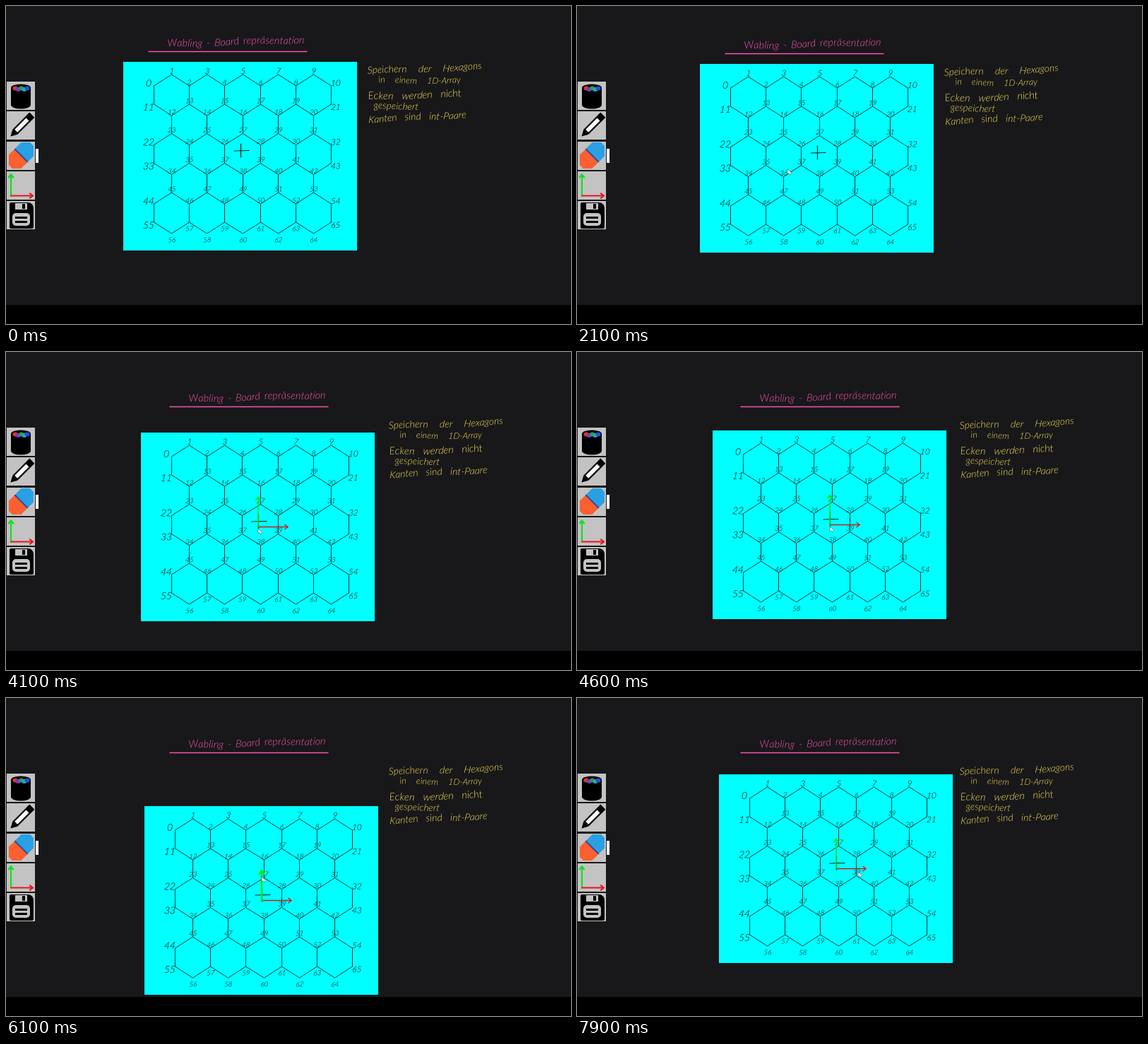
An HTML page with a canvas for the animation above (8000 ms loop, 800 by 450 pixels).

```html
<!DOCTYPE html>
<html lang="de">
<head>
<meta charset="utf-8">
<title>Board repräsentation</title>
<style>
html, body { margin: 0; width: 100%; height: 100%; overflow: hidden; background: #18171a; }
canvas { display: block; width: 800px; height: 450px; }
</style>
</head>
<body>
<canvas id="stage" width="800" height="450"></canvas>
<script>
const ctx = document.getElementById('stage').getContext('2d');
const LOOP = 8000, STEP = 100, PAN_END = 2700;
const HOME = { x: 166, y: 79 };
const BOARD = { w: 331, h: 267 };
const CENTER = { x: 166, y: 133.5 };

// Keys of [time, x, y]; the board first pans with the notes, then moves alone.
const boardKeys = [
  [1800, HOME.x, HOME.y], [PAN_END, 196, 92], [3600, 196, 92], [4250, 190, 117],
  [5300, 196, 94], [5500, 196, 94], [6000, 196, 158], [6500, 196, 108],
  [7400, 196, 108], [7900, 201, 108]
];
// Pointer position relative to the board.
const gripKeys = [
  [800, -56, 220], [1500, -126, 185], [1900, 120, 150], [2900, 166, 136],
  [5200, 166, 136], [5450, 166, 100], [6500, 166, 100], [6900, 213, 135], [7400, 197, 138]
];

function along(keys, t) {
  const next = keys.findIndex(key => t <= key[0]);
  if (next <= 0) {
    const [, x, y] = keys.at(next);
    return { x, y };
  }
  const [t0, x0, y0] = keys[next - 1], [t1, x1, y1] = keys[next];
  const u = (1 - Math.cos(Math.PI * (t - t0) / (t1 - t0))) / 2;
  return { x: Math.round(x0 + (x1 - x0) * u), y: Math.round(y0 + (y1 - y0) * u) };
}

function rect(color, x, y, w, h) {
  ctx.fillStyle = color;
  ctx.fillRect(x, y, w, h);
}

function ellipse(color, x, y, rx, ry) {
  ctx.fillStyle = color;
  ctx.beginPath();
  ctx.ellipse(x, y, rx, ry, 0, 0, Math.PI * 2);
  ctx.fill();
}

function trace(points) {
  ctx.beginPath();
  for (const [x, y] of points) ctx.lineTo(x, y);
}

function line(color, width, ...points) {
  ctx.strokeStyle = color;
  ctx.lineWidth = width;
  trace(points);
  ctx.stroke();
}

function poly(color, ...points) {
  ctx.fillStyle = color;
  trace(points);
  ctx.fill();
}

function arrow(color, width, x, y, dx, dy, head) {
  ctx.save();
  ctx.translate(x + dx, y + dy);
  ctx.rotate(Math.atan2(dy, dx));
  line(color, width, [-Math.hypot(dx, dy), 0], [0, 0]);
  line(color, width, [-head, -head * 0.8], [0, 0], [-head, head * 0.8]);
  ctx.restore();
}

const setFont = size => { ctx.font = `italic 300 ${size}px Lato, "Open Sans", sans-serif`; };

// Letters set one by one, each slightly tilted and shifted like handwriting.
function write(text, x, y, size, color, gap = 0, rise = 0) {
  setFont(size);
  ctx.fillStyle = color;
  const slope = rise / (ctx.measureText(text).width + gap);
  let pen = 0;
  [...text].forEach((ch, i) => {
    const wobble = Math.sin(i * 12.9 + text.length * 7.3);
    ctx.save();
    ctx.translate(x + pen, y + pen * slope + wobble * 0.6);
    ctx.rotate(wobble * 0.12);
    ctx.fillText(ch, 0, 0);
    ctx.restore();
    pen += ch === ' ' ? gap : ctx.measureText(ch).width;
  });
}

function drawNotes() {
  const pink = '#f456b0', gold = '#f0dc50';
  write('Wabling - Board repräsentation', 229, 58, 14.5, pink, 6, -6);
  line(pink, 1.4, [202, 64.5], [426, 64.5]);
  write('Speichern der Hexagons', 512, 96, 14, gold, 16, -6);
  write('in einem 1D-Array', 528, 109, 12.5, gold, 14);
  write('Ecken werden nicht', 513, 132, 14.5, gold, 12, -3);
  write('gespeichert', 521, 146, 13.5, gold);
  write('Kanten sind int-Paare', 513, 165, 14, gold, 11, -7);
}

// Six zigzag rows of eleven corners, numbered left to right.
function corner(row, j) {
  const peak = j % 2 ? 16 : 0;
  const shoulder = 34 + Math.floor(row / 2) * 83.5 + (row % 2) * 26;
  return [Math.round(43 + j * 25.1) + 0.5, shoulder + (row % 2 ? peak : -peak)];
}

function drawLabel(row, j) {
  const [x, y] = corner(row, j);
  const text = String(row * 11 + j);
  const side = j === 0 ? -8 : j === 10 ? 6 : 0;
  const size = j === 0 ? 14 : side || (row === 0 && j % 2) ? 12 : 10;
  const lift = side ? (row % 2 ? 3 : -5) : row === 5 ? 8 : -6;
  setFont(size);
  write(text, x + side - ctx.measureText(text).width / 2, y + lift + size * 0.36, size, '#000');
}

function drawBoard({ x, y }) {
  const ink = '#003c44';
  ctx.save();
  ctx.translate(x, y);
  rect('#00ffff', 0, 0, BOARD.w, BOARD.h);
  for (let row = 0; row < 6; row++) {
    const zigzag = Array.from({ length: 11 }, (_, j) => corner(row, j));
    line(ink, 1, ...zigzag);
    for (let j = row % 2; row < 5 && j < 11; j += 2) line(ink, 1, zigzag[j], corner(row + 1, j));
    for (let j = 0; j < 11; j++) drawLabel(row, j);
  }
  line('#002020', 1.2, [157, 126], [178, 125.5]);
  line('#002020', 1.2, [166.5, 116], [166.5, 135]);
  ctx.restore();
}

function drawGizmo(board, t) {
  const x = board.x + CENTER.x, y = board.y + CENTER.y;
  const greenHot = t < 3600 || (t >= 5300 && t <= 6500);
  arrow('#c81e1e', 1.4, x, y, 42, 0, 4);
  arrow('#14e614', greenHot ? 2.6 : 1.6, x, y, 0, -42, 4);
}

function drawBucket() {
  rect('#000', 7, 116, 28, 24);
  ellipse('#000', 21, 140, 14, 5.5);
  ellipse('#000', 21, 116, 14, 5.5);
  ['#d83434', '#7a38c8', '#22a050', '#20a8c0', '#2850d0'].forEach((color, i) =>
    ellipse(color, 13 + i * 4.3, 116.5 + (i % 2) * 1.5, 3.5, 3));
}

function drawPencil() {
  ctx.save();
  ctx.translate(22, 169);
  ctx.rotate(-Math.PI / 4);
  rect('#000', -13, -5, 34, 10);
  poly('#000', [-13, -5], [-22, 0], [-13, 5]);
  rect('#fff', -11, -2.8, 23, 5.6);
  ctx.restore();
}

function drawEraser() {
  ctx.save();
  ctx.beginPath();
  ctx.rect(4, 193, 35, 37);
  ctx.clip();
  ctx.translate(21.5, 211.5);
  ctx.rotate(-Math.PI / 4);
  rect('#fa6030', -22, -13, 22, 26);
  rect('#2aa0e4', 0, -13, 22, 26);
  rect('#344a9c', -1, -13, 2, 26);
  ctx.restore();
}

function drawAxes() {
  arrow('#10e020', 2.2, 7, 268.5, 0, -30, 4);
  arrow('#ec1420', 2.2, 7, 268.5, 31, 0, 4);
}

function drawDisk() {
  ctx.fillStyle = '#000';
  ctx.beginPath();
  ctx.roundRect(5, 278, 34, 37, [2, 8, 2, 2]);
  ctx.fill();
  rect('#c3c3c3', 13, 279, 17, 9);
  rect('#000', 23, 280, 4, 7);
  ctx.fillStyle = '#c3c3c3';
  ctx.beginPath();
  ctx.roundRect(9, 293, 25, 18, 5);
  ctx.fill();
  for (const y of [298, 304]) rect('#000', 13, y, 17, 3);
}

function drawToolbar(hover) {
  [drawBucket, drawPencil, drawEraser, drawAxes, drawDisk].forEach((icon, i) => {
    const y = Math.round(107 + i * 42.25);
    rect('#c3c3c3', 1, y, 40, 40);
    icon();
    if (icon === drawAxes && hover) rect('rgba(0,0,0,.35)', 1, y, 40, 40);
  });
  rect('#fff', 42, 202, 4, 20);
}

function drawCursor(x, y) {
  const shape = [[x, y], [x, y + 7], [x + 2, y + 5.5], [x + 4, y + 8], [x + 5.4, y + 5]];
  poly('#fff', ...shape);
  line('#555', 0.6, ...shape, shape[0]);
}

function draw(t) {
  rect('#18171a', 0, 0, 800, 450);
  rect('#000', 0, 423, 800, 27);
  ctx.lineCap = ctx.lineJoin = 'round';

  const pan = along(boardKeys, Math.min(t, PAN_END));
  ctx.save();
  ctx.translate(pan.x - HOME.x, pan.y - HOME.y);
  drawNotes();
  ctx.restore();

  const board = along(boardKeys, t);
  drawBoard(board);
  if (t >= 2900) drawGizmo(board, t);

  const grip = along(gripKeys, t);
  const x = board.x + grip.x, y = board.y + grip.y;
  const shown = t >= 800;
  drawToolbar(shown && x <= 41 && y >= 234 && y <= 274);
  if (shown) drawCursor(x, y);
}

const start = performance.now();
function tick() {
  const t = (performance.now() - start) % LOOP;
  draw(Math.floor(t / STEP) * STEP);
  requestAnimationFrame(tick);
}
tick();
</script>
</body>
</html>
```
